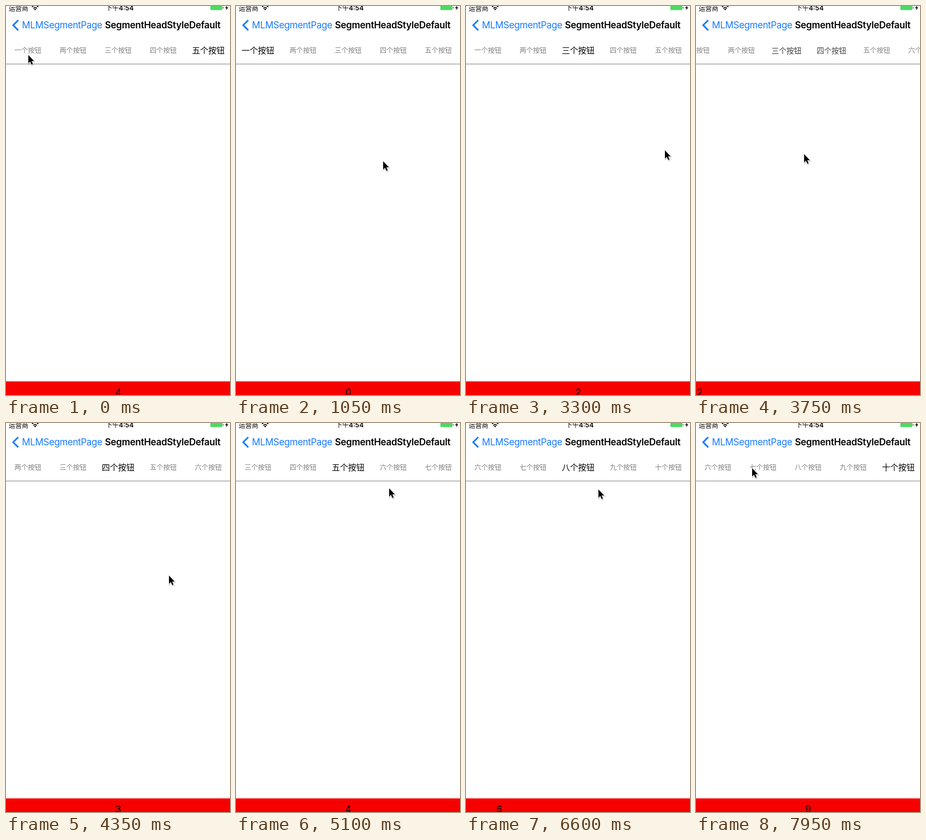
Recreate the animation shown at these times as an HTML page. Size 411 by 714 pixels, loop 8 s.

```html
<!DOCTYPE html>
<html lang="zh">
<head>
<meta charset="utf-8">
<style>
html, body { margin: 0; width: 100%; height: 100%; overflow: hidden; background: #fff; }
svg { display: block; width: 411px; height: 714px; font-family: Inter, "Noto Sans CJK SC", "Noto Sans CJK", sans-serif; }
#head, #pages { text-anchor: middle; }
#pages { font-size: 17px; }
</style>
</head>
<body>
<svg viewBox="0 0 411 714">
  <rect width="411" height="714" fill="#fff"/>
  <g font-size="12">
    <text x="5" y="8.5">运营商</text>
    <text x="183" y="8" font-weight="600"><tspan font-weight="400">下午</tspan>4:54</text>
  </g>
  <path d="M47.7 1.6a8.2 8.2 0 0 1 11.6 0M50.2 4.3a4.7 4.7 0 0 1 6.6 0" fill="none" stroke="#000" stroke-width="1.8"/>
  <path d="M53.5 8l-2-2.1a2.8 2.8 0 0 1 4 0z"/>
  <path d="M375 0h22v6a1.5 1.5 0 0 1-1.5 1.5h-19a1.5 1.5 0 0 1-1.5-1.5z" fill="#4cd964"/>
  <path d="M398 1.5v3.5a2 2 0 0 0 0-3.5zM406 -1l-4 5h2.6l-1.2 4 4.6-5.4h-2.8z"/>
  <path d="M22.5 26l-9.3 9.3 9.3 9.3" fill="none" stroke="#1a7bff" stroke-width="3"/>
  <g font-size="17">
    <text x="29.3" y="41.3" fill="#1a7bff" letter-spacing="-.4">MLMSegmentPage</text>
    <text x="181.5" y="41.3" font-weight="600" letter-spacing="-.27">SegmentHeadStyleDefault</text>
  </g>
  <g id="head"></g>
  <rect y="106" width="411" height="1" fill="#808080"/>
  <rect y="689" width="411" height="25" fill="#f70000"/>
  <g id="pages"></g>
  <g id="cursor">
    <path d="M0 0V15L3.4 11.8 5.9 17.5 8.2 16.5 5.8 11H10.5Z" transform="translate(.8 1.4)" opacity=".18" stroke="#000" stroke-width="2"/>
    <path d="M0 0V15L3.4 11.8 5.9 17.5 8.2 16.5 5.8 11H10.5Z" stroke="#fff" stroke-width="1" paint-order="stroke"/>
  </g>
</svg>
<script>
const STEP = 150, LOOP = 8000, ITEM = 82.75, PAGE = 414;
const $ = id => document.getElementById(id);
const clamp = (v, lo, hi) => Math.min(hi, Math.max(lo, v));

function addText(parent, str) {
  const el = document.createElementNS('http://www.w3.org/2000/svg', 'text');
  el.textContent = str;
  return parent.appendChild(el);
}
const tabs = [...'一二三四五六七八九十'].map((c, i) => addText($('head'), (i === 1 ? '两' : c) + '个按钮'));
const digits = tabs.map((_, i) => addText($('pages'), i));

// step, x, y of the pointer
const path = [
  [0, 41, 90], [2, 41, 90], [4, 130, 190], [7, 270, 285], [9, 306, 290], [12, 96, 292],
  [15, 308, 286], [16, 350, 280], [19, 110, 278], [22, 365, 265], [23, 365, 266],
  [26, 115, 275], [29, 299, 280], [31, 288, 86], [33, 286, 92], [34, 281, 120],
  [35, 290, 112], [36, 300, 92], [38, 140, 94], [42, 208, 88], [43, 208, 90],
  [44, 243, 122], [47, 367, 88], [49, 367, 86], [51, 260, 72], [53, 103, 83]
];

// step, target page, whether tapped rather than swiped
const moves = [[1, 0, true], [10, 1], [17, 2], [24, 3], [31, 4, true], [43, 7, true], [49, 9, true]];

function pointer(k) {
  const i = Math.max(1, path.findIndex(p => p[0] >= k));
  const [a, ax, ay] = path[i - 1], [b, bx, by] = path[i];
  const f = (k - a) / (b - a);
  return [ax + (bx - ax) * f, ay + (by - ay) * f];
}

function paging(k) {
  let from = 4, page = 4, pick = 4;
  for (const [at, to, tap] of moves) {
    if (k < at) break;
    const rates = tap ? [0, 1 - .65 / Math.abs(to - from)] : [.2, .48, .75];
    page = from + (to - from) * (rates[k - at] ?? 1);
    pick = tap ? to : page;
    from = to;
  }
  return { page, pick };
}

function headScroll(k, page) {
  if (k < 10) return 0;
  if (k < 36) return clamp(page - 2, 0, 5);
  const left = 1 - Math.min(1, (k - 36) / 5);
  return 5 - 3 * left * left;
}

function draw(k) {
  const { page, pick } = paging(k);
  const scroll = headScroll(k, page);
  tabs.forEach((el, i) => {
    const w = Math.max(0, 1 - Math.abs(i - pick));
    const size = 12.4 + 2.6 * w, grey = 128 * (1 - w);
    el.setAttribute('x', 40.2 + (i - scroll) * ITEM);
    el.setAttribute('y', 81.5 + size * .38);
    el.setAttribute('font-size', size);
    el.setAttribute('fill', `rgb(${grey},${grey},${grey})`);
  });
  digits.forEach((el, i) => {
    el.setAttribute('x', 206 + (i - page) * PAGE);
    el.setAttribute('y', 715);
  });
  $('cursor').setAttribute('transform', `translate(${pointer(k)})`);
}

const start = performance.now();
function tick() {
  draw(Math.floor((performance.now() - start) % LOOP / STEP));
  requestAnimationFrame(tick);
}
tick();
</script>
</body>
</html>
```
